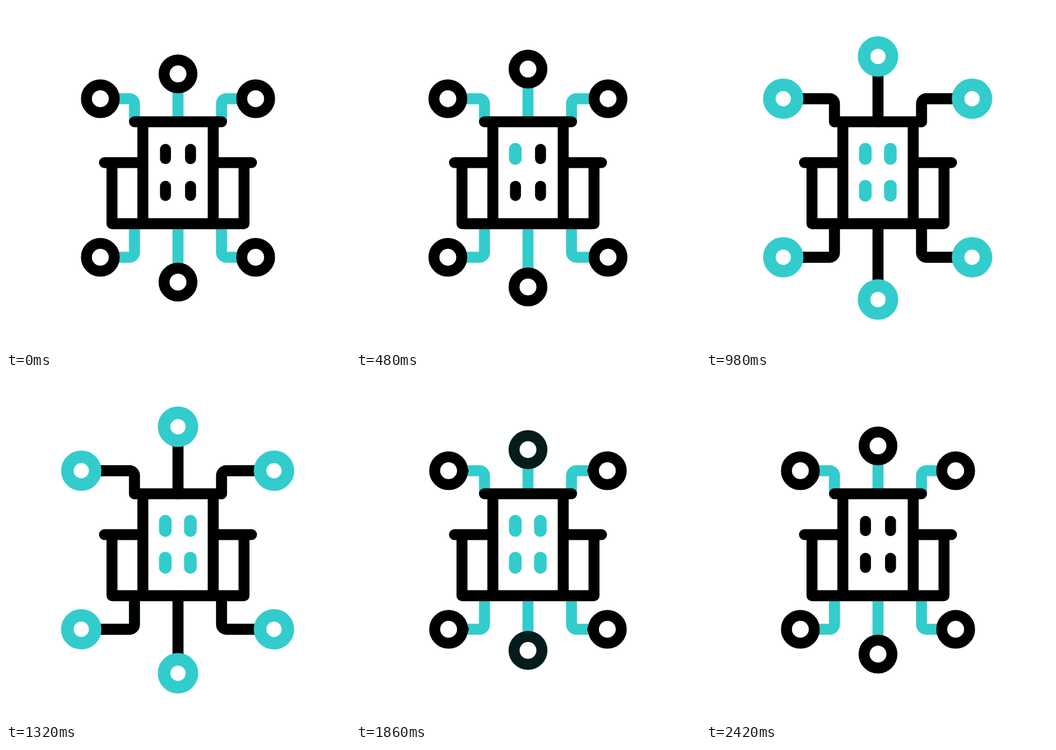
Write an HTML page that moves like this. It is 640 px wide and 640 px high and loops after 2.8 s.

```html
<!DOCTYPE html>
<html lang="en">
<head>
<meta charset="utf-8">
<title>Connected building</title>
<style>
html, body { margin: 0; width: 100%; height: 100%; overflow: hidden; background: #fff; }
svg { display: block; width: 100vw; height: 100vh; }
</style>
</head>
<body>
<svg id="stage" viewBox="0 0 640 640" fill="none" stroke="#000" stroke-width="20.4" stroke-linecap="round" stroke-linejoin="round">
  <g id="wires"></g>
  <g id="trims"></g>
  <path d="M239 215.4H401M254.6 215.4V405M385.5 215.4V405M183.2 291.4H254M386 291.4H456.8M197.2 291.4V405H442.8V291.4"/>
  <g id="windows"></g>
  <g id="balls"></g>
</svg>
<script>
const LOOP = 2800, TEAL = '#33cccc', WIDE = 23.4, RING = 25.9;

function add(parent, tag, attrs) {
  const el = document.createElementNS('http://www.w3.org/2000/svg', tag);
  for (const k in attrs) el.setAttribute(k, attrs[k]);
  document.getElementById(parent).append(el);
  return el;
}

const clamp = x => Math.min(1, Math.max(0, x));
const ramp = (t, start, length) => clamp((t - start) / length);
const smooth = u => u * u * (3 - 2 * u);
const glide = (t, start, length) => smooth(ramp(t, start, length));
const pulse = (t, on, off, fade) => ramp(t, on, fade) - ramp(t, off, fade);

// Distance from rest: windup, spread, pull back, swing out, settle
function reach(t, lagOut, lagBack) {
  const out = 363 + lagOut, back = 1632 + lagBack;
  return -6 * glide(t, 0, out)
    + 43 * (1 - Math.exp(-Math.max(0, t - out) / 275))
    - 44 * glide(t, back, 240)
    + 15 * glide(t, back + 240, 240)
    - 8 * glide(t, back + 480, 243);
}

// sx: -1 left, 0 middle, 1 right; sy: -1 top, 1 bottom
const nodes = [];
for (const sy of [-1, 1]) for (const sx of [-1, 0, 1]) {
  nodes.push({
    sx, sy,
    span: sx > 0 ? 0.96 : 1,
    wire: add('wires', 'path', { stroke: TEAL, 'stroke-linecap': 'butt' }),
    trim: add('trims', 'path', {}),
    ball: add('balls', 'circle', { r: RING, fill: '#fff' }),
    glow: add('balls', 'circle', { r: RING, stroke: TEAL, 'stroke-width': WIDE })
  });
}

// Windows light up one by one and go dark in reverse order
const panes = [];
for (let i = 0; i < 4; i++) {
  const x = 296.7 + 46.6 * (i % 2), y = 266.8 + 68.6 * (i >> 1), order = (4 - i) % 4;
  add('windows', 'path', { d: `M${x} ${y}v17.2` });
  panes.push({
    on: 400 + 85 * order,
    off: 2140 - 93 * order,
    glow: add('windows', 'path', { d: `M${x - 0.3} ${y - 0.3}v17.2`, stroke: TEAL, 'stroke-width': WIDE })
  });
}

function drawNode({ sx, sy, span, wire, trim, ball, glow }, t) {
  const startY = sy < 0 ? 215.4 : 405;
  let x, y, d, lag, light;
  if (sx === 0) {
    x = 320;
    y = 320 + sy * (193.7 + reach(t, 0, 0));
    d = `M320 ${startY}V${y - sy * RING}`;
    lag = 6;
    light = pulse(t, 640, 1688, 200);
  } else {
    x = 320 + sx * (144.5 + span * reach(t, 40, 65));
    y = 320 + sy * 147.5;
    const cx = 320 + sx * 81, r = 9, sweep = sx * sy < 0 ? 1 : 0;
    d = `M${cx} ${startY}V${y - sy * r}A${r} ${r} 0 0 ${sweep} ${cx + sx * r} ${y}H${x - sx * RING}`;
    lag = 12;
    light = pulse(t, 676, 1656, 200);
  }
  wire.setAttribute('d', d);
  trim.setAttribute('d', d);
  const len = trim.getTotalLength();
  const head = glide(t, 560 + lag, 340), tail = glide(t, 1534 + lag, 340);
  trim.setAttribute('visibility', head > tail ? 'visible' : 'hidden');
  trim.setAttribute('stroke-dasharray', `${(head - tail) * len} 1000`);
  trim.setAttribute('stroke-dashoffset', -tail * len);
  for (const c of [ball, glow]) {
    c.setAttribute('cx', x);
    c.setAttribute('cy', y);
  }
  glow.setAttribute('opacity', light);
}

function draw(t) {
  for (const n of nodes) drawNode(n, t);
  for (const p of panes) p.glow.setAttribute('opacity', pulse(t, p.on, p.off, 66));
}

const begin = performance.now();
function tick() {
  draw((performance.now() - begin) % LOOP);
  requestAnimationFrame(tick);
}
tick();
</script>
</body>
</html>
```
